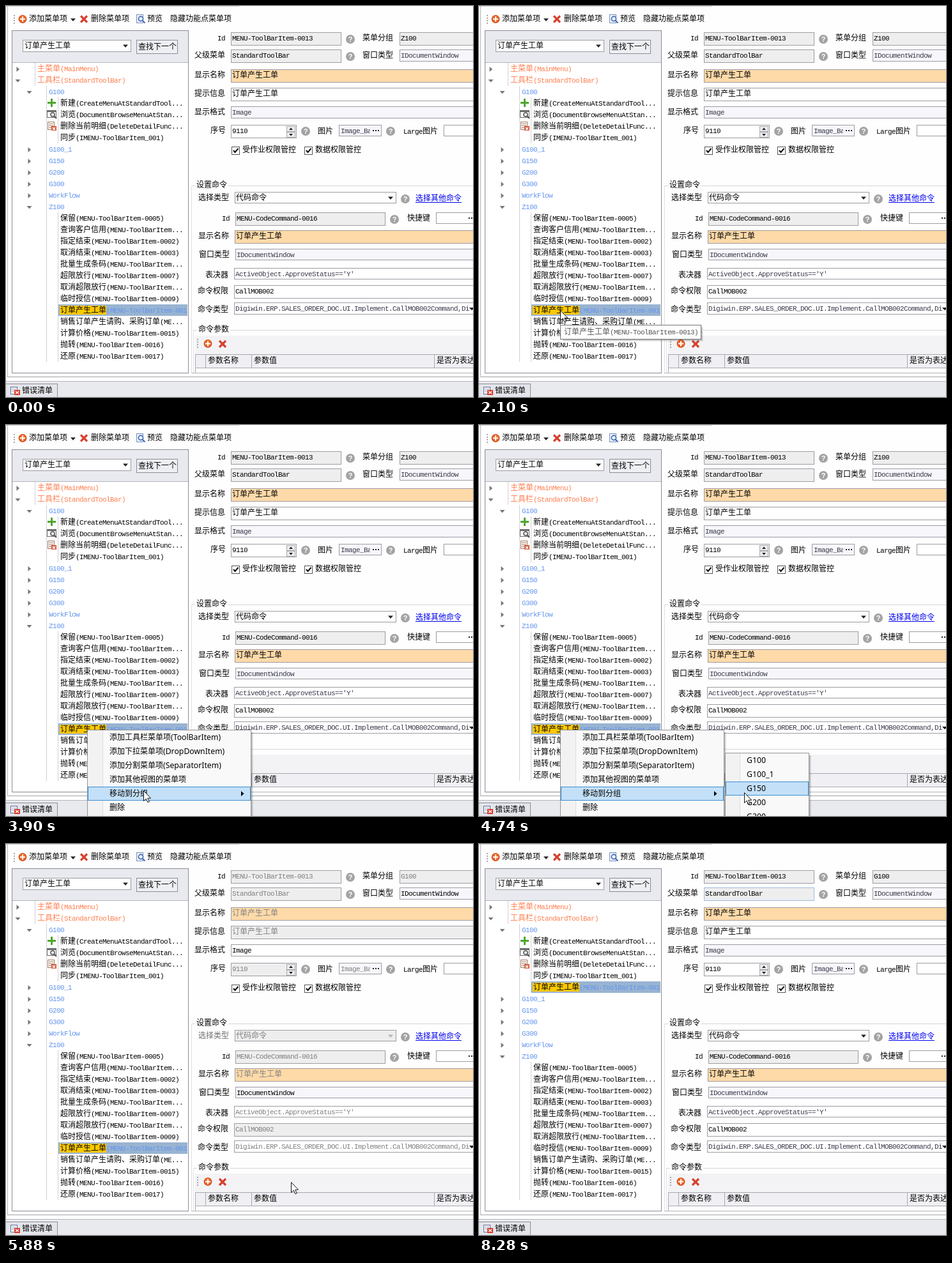
Animation of 731x612 px, one loop 8820 ms. Source, as an HTML page with a canvas:

```html
<!DOCTYPE html>
<html lang="zh">
<head>
<meta charset="utf-8">
<style>
html, body { margin: 0; width: 731px; height: 612px; overflow: hidden; background: #fff; }
canvas { display: block; }
</style>
</head>
<body>
<canvas id="stage" width="731" height="612"></canvas>
<script>
const g = document.getElementById('stage').getContext('2d');
const LOOP = 8820, STEP = 60;
const CJK = '12px "Noto Sans CJK SC", "Noto Sans CJK", sans-serif';
const MONO = '11px "Liberation Mono", monospace';
const MENU = '12.25px "Noto Sans", "Noto Sans CJK SC", sans-serif';
const INK = '#000', NAVY = '#3a3a4c', DIM = '#808080';
const GRAY = '#eeeeef', LILAC = '#f6f6fb', PEACH = '#ffdaa9', EDGE = '#9c9ca4';

const rect = (x, y, w, h, c) => { g.fillStyle = c; g.fillRect(x, y, w, h); };
const box = (x, y, w, h, fill, edge = EDGE) => {
  rect(x, y, w, h, edge);
  rect(x + 1, y + 1, w - 2, h - 2, fill);
};
const poly = (pts, c) => {
  g.beginPath();
  pts.forEach(([x, y]) => g.lineTo(x, y));
  g.closePath();
  g.fillStyle = c;
  g.fill();
};
const line = (pts, c, w) => {
  g.beginPath();
  pts.forEach(([x, y]) => g.lineTo(x, y));
  g.strokeStyle = c;
  g.lineWidth = w;
  g.stroke();
};
const disc = (x, y, r, c) => {
  g.beginPath();
  g.arc(x, y, r, 0, 7);
  g.fillStyle = c;
  g.fill();
};
const down = (x, y, c = '#222') => poly([[x - 4, y - 2], [x + 4, y - 2], [x, y + 2.5]], c);
const right = (x, y, c = '#222') => poly([[x - 2, y - 4], [x + 2.5, y], [x - 2, y + 4]], c);

// Half-width latin on a 6px pitch, full-width characters on 12px
function text(s, x, cy, c = INK) {
  g.fillStyle = c;
  for (const run of s.match(/[\x00-\x7f]+|[^\x00-\x7f]+/g)) {
    const latin = run.charCodeAt(0) < 128;
    g.font = latin ? MONO : CJK;
    g.letterSpacing = latin ? '-0.6px' : '0px';
    g.fillText(run, x, cy + 4);
    x += run.length * (latin ? 6 : 12);
  }
  g.letterSpacing = '0px';
}
function menuText(s, x, cy) {
  g.fillStyle = INK;
  for (const run of s.match(/[\x00-\x7f]+|[^\x00-\x7f]+/g)) {
    g.font = run.charCodeAt(0) < 128 ? MENU : CJK;
    g.fillText(run, x, cy + 4);
    x += g.measureText(run).width;
  }
}

function help(x, y) {
  disc(x, y, 7, '#a3a3a3');
  g.font = 'bold 11px "Liberation Sans", sans-serif';
  g.fillStyle = '#fff';
  g.fillText('?', x - 3.3, y + 4);
}
function addIcon(x, y) {
  disc(x, y, 6.5, '#d9541e');
  disc(x, y - 0.5, 5, '#ec6a2c');
  rect(x - 4, y - 1, 8, 2, '#fff');
  rect(x - 1, y - 4, 2, 8, '#fff');
}
function crossIcon(x, y, r = 5) {
  line([[x - r, y - r], [x + r, y + r]], '#d6412f', 3.2);
  line([[x + r, y - r], [x - r, y + r]], '#d6412f', 3.2);
}
function grip(x, y) {
  for (let i = 0; i < 4; i++) rect(x, y + i * 4, 2, 2, '#a8a8ae');
}
function lens(x, y, r, c) {
  g.beginPath();
  g.arc(x, y, r, 0, 7);
  g.strokeStyle = c;
  g.lineWidth = 1.6;
  g.stroke();
  line([[x + r - 1, y + r - 1], [x + r + 3, y + r + 3]], c, 2);
}
function check(x, y) {
  box(x, y, 13, 13, '#fff', '#555');
  line([[x + 3, y + 6], [x + 5.5, y + 9], [x + 10.5, y + 3]], '#111', 2);
}
function dots(x, y) {
  for (let i = 0; i < 3; i++) rect(x + i * 4, y, 2, 2, '#222');
}

function frame() {
  rect(0, 0, 731, 612, '#fefefe');
  rect(0, 0, 365, 1, '#d0d0d4');
  rect(2, 0, 1, 581, '#b4b4ba');
  rect(2, 580, 729, 1, '#a4a4aa');
  rect(0, 587, 731, 25, '#e9eaee');
  rect(0, 587, 731, 1, '#b4b4bc');
  box(-1, 591, 82, 30, '#e4e5eb', '#8e8e98');
  box(7, 596, 11, 12, '#fff', '#5c6c94');
  rect(9, 599, 7, 1, '#8c9cc0');
  rect(9, 602, 5, 1, '#8c9cc0');
  rect(13, 601, 9, 8, '#d93a2c');
  line([[15, 603], [20, 607]], '#fff', 1.4);
  line([[20, 603], [15, 607]], '#fff', 1.4);
  text('错误清单', 25, 602);

  grip(12, 14);
  addIcon(26, 20.5);
  text('添加菜单项', 36, 20);
  down(105, 21.5);
  crossIcon(122, 20.5);
  text('删除菜单项', 133, 20);
  box(204, 13, 11, 14, '#eef3fc', '#7c90bc');
  lens(211, 20, 3.6, '#3d69b0');
  text('预览', 221, 20);
  text('隐藏功能点菜单项', 257, 20);
}

const PICK = '订单产生工单';
const G100 = ['新建(CreateMenuAtStandardTool...', '浏览(DocumentBrowseMenuAtStan...',
  '删除当前明细(DeleteDetailFunc...', '同步(IMENU-ToolBarItem_001)'];
const GROUPS = ['G100_1', 'G150', 'G200', 'G300', 'WorkFlow'];
const Z_HEAD = ['保留(MENU-ToolBarItem-0005)', '查询客户信用(MENU-ToolBarItem...',
  '指定结束(MENU-ToolBarItem-0002)', '取消结束(MENU-ToolBarItem-0003)',
  '批量生成条码(MENU-ToolBarItem...', '超限放行(MENU-ToolBarItem-0007)',
  '取消超限放行(MENU-ToolBarItem...', '临时授信(MENU-ToolBarItem-0009)'];
const Z_TAIL = ['销售订单产生请购、采购订单(ME...', '计算价格(MENU-ToolBarItem-0015)',
  '抛转(MENU-ToolBarItem-0016)', '还原(MENU-ToolBarItem-0017)'];

function tree(moved) {
  box(9, 38, 277, 537, '#fff', '#8c8c96');
  rect(10, 39, 275, 49, '#e9eaef');
  rect(10, 88, 275, 1, '#b4b4bc');
  box(26, 53, 170, 19, '#fff');
  text(PICK, 29, 62);
  down(187, 62.5);
  box(204, 53, 65, 22, '#eeeff3', '#8c8c98');
  text('查找下一个', 207, 64);

  const kid = s => [2, s], group = (s, open) => [1, s, open];
  const here = moved ? [] : [kid(PICK)], there = moved ? [kid(PICK)] : [];
  const rows = [[0, '主菜单(MainMenu)', false], [0, '工具栏(StandardToolBar)', true],
    group('G100', true), ...G100.map(kid), ...there,
    ...GROUPS.map(s => group(s, false)), group('Z100', true),
    ...Z_HEAD.map(kid), ...here, ...Z_TAIL.map(kid)];
  rows.forEach(([depth, s, open], i) => {
    const cy = 98 + i * 18, x = 49 + depth * 18;
    rect(x - 4, cy - 9, 1, 18, '#d2d2d6');
    if (depth === 2) rect(63, cy - 9, 1, 18, '#d2d2d6');
    if (s === PICK) {
      rect(82, cy - 9, 202, 18, '#99b4d1');
      rect(84, cy - 7, 73, 14, '#ffc800');
      text(s, x, cy);
      text('(MENU-ToolBarItem-001', 157, cy, '#6495ed');
    } else text(s, x, cy, ['#ff7f50', '#6495ed', INK][depth]);
    if (depth < 2) (open ? down : right)(18.5 + depth * 18, cy + 1, '#777');
  });

  rect(65, 150, 13, 3, '#4ea72e');
  rect(70, 145, 3, 13, '#4ea72e');
  box(64, 163, 15, 12, '#fff', '#6c6c6c');
  rect(64, 163, 15, 3, '#6c6c6c');
  lens(73, 170, 3, '#555');
  box(65, 181, 11, 13, '#fff', '#a07860');
  for (let i = 0; i < 3; i++) rect(67, 184 + i * 3, 7, 1, '#a07860');
  rect(71, 188, 8, 7, '#d85a3c');
  line([[73, 190], [77, 194]], '#fff', 1.2);
  line([[77, 190], [73, 194]], '#fff', 1.2);
}

function field(x, y, w, h, fill, s, c = INK, edge = EDGE) {
  box(x, y, w, h, fill, edge);
  if (s) text(s, x + 2, y + 9, c);
}
const label = (s, x, cy, c) => text(s, x, cy, c);

function form(group, off, hover) {
  const ink = off ? DIM : INK, open = off ? GRAY : '#fff', doc = off ? INK : NAVY;
  label('Id', 331, 50);
  field(352, 41, 173, 21, GRAY, 'MENU-ToolBarItem-0013', ink);
  help(539, 52);
  label('菜单分组', 558, 50);
  field(616, 41, 130, 21, GRAY, group, ink);
  label('父级菜单', 295, 77);
  field(352, 68, 173, 21, GRAY, 'StandardToolBar', ink, hover.parent);
  help(539, 79);
  label('窗口类型', 558, 77);
  field(616, 68, 130, 19, LILAC, 'IDocumentWindow', doc);
  label('显示名称', 295, 108);
  field(352, 99, 400, 21, PEACH, PICK, ink, hover.name);
  label('提示信息', 295, 137);
  field(352, 128, 400, 21, open, PICK, ink);
  label('显示格式', 295, 166);
  field(352, 157, 400, 19, off ? '#fff' : LILAC, 'Image', off ? INK : NAVY);

  label('序号', 320, 195);
  field(352, 186, 103, 21, open, '9110', ink);
  box(439, 188, 14, 9, '#ececf0', '#aaa');
  box(439, 197, 14, 9, '#ececf0', '#aaa');
  poly([[443, 194], [449, 194], [446, 190.5]], '#222');
  poly([[443, 200], [449, 200], [446, 203.5]], '#222');
  help(469, 196);
  label('图片', 488, 196);
  box(521, 186, 67, 18, LILAC);
  g.save();
  g.beginPath();
  g.rect(521, 186, 49, 18);
  g.clip();
  text('Image_Ba', 524, 195, off ? DIM : NAVY);
  g.restore();
  dots(574, 194);
  help(602, 196);
  label('Large图片', 622, 196);
  field(685, 186, 60, 18, '#fff');
  check(353, 220);
  text('受作业权限管控', 370, 225);
  check(467, 220);
  text('数据权限管控', 484, 225);

  rect(290, 281, 441, 1, '#d6d6da');
  rect(290, 281, 1, 293, '#e2e2e6');
  rect(296, 274, 52, 13, '#fefefe');
  text('设置命令', 298, 280);
  label('选择类型', 301, 300, off ? '#707070' : INK);
  field(358, 291, 253, 18, open, '代码命令', ink);
  down(602, 300.5, off ? '#b4b4b4' : '#222');
  help(625, 302);
  text('选择其他命令', 641, 301, '#0000f0');
  rect(641, 307, 72, 1, '#0000f0');
  label('Id', 338, 332);
  field(359, 323, 235, 21, GRAY, 'MENU-CodeCommand-0016', ink);
  help(608, 334);
  label('快捷键', 628, 332);
  field(673, 323, 70, 18, '#fff');
  dots(724, 331);
  label('显示名称', 301, 360);
  field(358, 351, 400, 21, PEACH, PICK, ink);
  label('窗口类型', 302, 389);
  field(359, 380, 400, 18, LILAC, 'IDocumentWindow', doc);
  label('表决器', 312, 421);
  field(357, 410, 400, 18, '#fff', "ActiveObject.ApproveStatus=='Y'", off ? DIM : NAVY);
  label('命令权限', 300, 446);
  field(357, 437, 400, 21, open, 'CallMOB002', ink);
  label('命令类型', 300, 475);
  field(357, 464, 400, 19, '#fff',
    'Digiwin.ERP.SALES_ORDER_DOC.UI.Implement.CallMOB002Command,Di', off ? DIM : NAVY);
  down(729, 474);

  rect(293, 507, 438, 1, '#d6d6da');
  rect(293, 507, 1, 67, '#e2e2e6');
  rect(299, 500, 52, 13, '#fefefe');
  text('命令参数', 301, 506);
  rect(296, 516, 435, 29, '#f3f3f6');
  grip(299, 521);
  addIcon(316, 528.5);
  crossIcon(339, 529);
  box(296, 545, 450, 22, '#f0f0f4', '#a8a8b0');
  for (const x of [312, 384, 670]) rect(x, 546, 1, 20, '#a8a8b0');
  text('参数名称', 316, 555);
  text('参数值', 388, 555);
  text('是否为表达', 674, 555);
  rect(296, 567, 1, 7, '#a8a8b0');
  rect(290, 574, 441, 1, '#b4b4ba');
}

function shadow(x, y, w, h) {
  for (let i = 1; i < 5; i++) rect(x + 4, y + 4, w - 4 + i - 1, h - 4 + i - 1, 'rgba(0,0,0,.09)');
}
function tooltip() {
  shadow(127, 499, 221, 23);
  box(127, 499, 221, 23, '#fff', '#767676');
  text('订单产生工单(MENU-ToolBarItem-0013)', 133, 510, '#575757');
}

const ITEMS = ['添加工具栏菜单项(ToolBarItem)', '添加下拉菜单项(DropDownItem)',
  '添加分割菜单项(SeparatorItem)', '添加其他视图的菜单项', '移动到分组', '删除'];
const TARGETS = ['G100', 'G100_1', 'G150', 'G200', 'G300'];

function menu(x, y, w, gutter, items, active) {
  shadow(x, y, w, 160);
  box(x, y, w, 160, '#f9f9f9', '#969696');
  rect(x + 1, y + 1, gutter, 150, '#f2f2f2');
  rect(x + gutter, y + 1, 1, 150, '#dedede');
  items.forEach((s, i) => {
    if (i === active) box(x + 1, y + 1 + i * 22, w - 2, 22, '#c3e0f8', '#3c8ed0');
    menuText(s, x + gutter + 11, y + 12 + i * 22);
  });
}

// Pointer stops: time, x, y
const PATH = [[240, 710, 77], [300, 424, 304], [360, 205, 477], [420, 127, 537], [540, 127, 537],
  [720, 124, 515], [1020, 127, 476], [3480, 127, 476], [3720, 168, 520], [3900, 215, 572],
  [4020, 216, 576], [4320, 216, 576], [4500, 290, 584], [4680, 400, 580], [4860, 445, 565],
  [5040, 449, 540], [5220, 446, 529], [6420, 446, 529], [6600, 335, 440], [6840, 201, 335],
  [7080, 201, 335], [7260, 178, 290], [7380, 157, 255], [7440, 165, 232], [7560, 360, 122],
  [7680, 500, 80], [7800, 735, 72]];

function pointer(t) {
  const i = PATH.findIndex(p => p[0] > t);
  if (i < 1) return null;
  const [t0, x0, y0] = PATH[i - 1], [t1, x1, y1] = PATH[i], k = (t - t0) / (t1 - t0);
  return [Math.round(x0 + (x1 - x0) * k), Math.round(y0 + (y1 - y0) * k)];
}
function cursor([x, y]) {
  const arrow = [[0, 0], [0, 16], [3.7, 12.6], [6.5, 18.2], [8.8, 17.2], [6.2, 11.8], [11, 11.6]]
    .map(([a, b]) => [x + a + 0.5, y + b + 0.5]);
  poly(arrow, '#fff');
  line([...arrow, arrow[0]], '#111', 1);
}

function draw(t) {
  const at = pointer(t), moved = t >= 5940;
  const hover = {};
  if (t >= 7560 && t < 8040) hover.name = '#7fa9d6';
  if (t >= 7680) hover.parent = t < 8040 ? '#6f9fd4' : t < 8280 ? '#86add8' : '#9dbbd9';

  frame();
  tree(moved);
  form(t >= 5820 ? 'G100' : 'Z100', t >= 5820 && !moved, hover);
  if (t >= 2100 && t < 2400) tooltip();
  if (t >= 3120 && t < 5760) {
    const inSub = t >= 4200 && at[0] >= 385;
    menu(127, 477, 257, 24, ITEMS, inSub ? 4 : Math.floor((at[1] - 478) / 22));
    right(370, 577, '#000');
    if (t >= 4200) menu(385, 513, 132, 23, TARGETS, inSub ? Math.floor((at[1] - 514) / 22) : -1);
  }
  if (at) cursor(at);
}

let start = null;
function tick(now) {
  if (start === null) start = now;
  const t = (now - start) % LOOP;
  draw(Math.floor(t / STEP) * STEP);
  requestAnimationFrame(tick);
}
draw(0);
requestAnimationFrame(tick);
</script>
</body>
</html>
```
